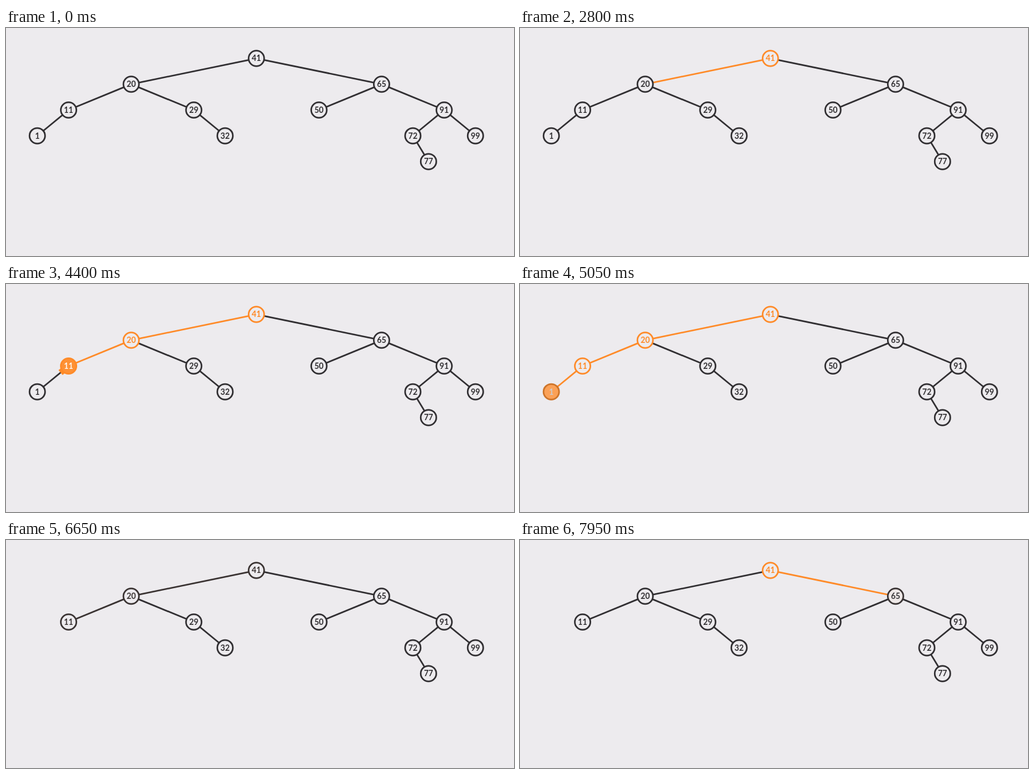
Write an HTML page that moves like this. It is 800 by 360 pixels and loops after 8000 ms.

```html
<!DOCTYPE html>
<html lang="en">
<head>
<meta charset="utf-8">
<title>Binary search tree removal</title>
<style>
  html, body { margin: 0; width: 100%; height: 100%; overflow: hidden; background: #edebee; }
  svg { display: block; width: 100%; height: 100%; }
  text { font: 700 12.5px Lato, "Open Sans", sans-serif; text-anchor: middle; }
</style>
</head>
<body>
<svg id="stage" viewBox="0 0 800 360"></svg>
<script>
const LOOP = 8000, FIRST = 1748, STEP = 510, DUR = 400;
const BG = [237, 235, 238], DARK = [48, 46, 49], ORANGE = [255, 138, 39], WHITE = [255, 255, 255];

// ring, fill, label
const LOOK = {
  idle: [DARK, BG, DARK],
  hot: [ORANGE, ORANGE, WHITE],
  seen: [ORANGE, BG, ORANGE]
};

// Insertion order builds the tree shape
const KEYS = [41, 20, 65, 11, 29, 50, 91, 1, 32, 72, 99, 77];

// Step number at which each node takes on a look
const NODE_STEPS = {
  41: [[0, 'hot'], [1, 'seen'], [9, 'idle'], [10, 'hot'], [11, 'seen']],
  20: [[2, 'hot'], [3, 'seen'], [9, 'idle']],
  11: [[4, 'hot'], [5, 'seen'], [9, 'idle']],
  1: [[6, 'hot'], [7, 'idle']],
  65: [[12, 'hot']]
};

// Steps at which the edge above a node is traced and reset
const EDGE_STEPS = { 20: [1, 9], 11: [3, 9], 1: [5, 99], 65: [11, 99] };
const REMOVED = 1, REMOVE_STEP = 8;

const stage = document.getElementById('stage');
const clamp = v => Math.max(0, Math.min(1, v));
const ease = u => u < .5 ? 4 * u ** 3 : 1 - 4 * (1 - u) ** 3;
const progress = (t, step) => clamp((t - FIRST - step * STEP) / DUR);
const mix = (a, b, u) => a.map((v, i) => v + (b[i] - v) * u);
const rgb = c => `rgb(${c.map(Math.round)})`;

function add(name, attrs, parent) {
  const el = document.createElementNS('http://www.w3.org/2000/svg', name);
  set(el, attrs);
  return parent.appendChild(el);
}
function set(el, attrs) {
  for (const k in attrs) el.setAttribute(k, attrs[k]);
}

function buildTree() {
  const nodes = [];
  for (const key of KEYS) {
    const node = { key, x: 394.3, y: 48, parent: null, kids: {} };
    let cur = nodes[0], dx = 197.15;
    while (cur) {
      const side = key < cur.key ? -1 : 1;
      node.parent = cur;
      node.x = cur.x + side * dx;
      node.y = cur.y + 40.72;
      dx /= 2;
      if (!cur.kids[side]) { cur.kids[side] = node; break; }
      cur = cur.kids[side];
    }
    nodes.push(node);
  }
  return nodes;
}

const nodes = buildTree();
const edgeLayer = add('g', {}, stage);
const traceLayer = add('g', { stroke: rgb(ORANGE), 'stroke-width': 10 }, stage);
const nodeLayer = add('g', {}, stage);

for (const n of nodes) {
  if (n.parent) {
    const from = { x1: n.parent.x, y1: n.parent.y };
    n.edge = add('line', { ...from, 'stroke-width': 2.5 }, edgeLayer);
    if (EDGE_STEPS[n.key]) n.trace = add('line', from, traceLayer);
  }
  n.disc = add('circle', { cx: n.x, cy: n.y }, nodeLayer);
  n.label = add('text', { x: n.x, y: n.y + 4.4 }, nodeLayer);
  n.label.textContent = n.key;
}

function reach(line, n, u) {
  const p = n.parent;
  set(line, { x2: p.x + (n.x - p.x) * u, y2: p.y + (n.y - p.y) * u });
}

function drawNode(n, t, size) {
  let look = LOOK.idle;
  for (const [step, name] of NODE_STEPS[n.key] || []) {
    const u = ease(progress(t, step));
    look = look.map((c, i) => mix(c, LOOK[name][i], u));
  }
  set(n.disc, {
    r: 12.25 * size, 'stroke-width': 2.5 * size,
    stroke: rgb(look[0]), fill: rgb(look[1])
  });
  n.label.setAttribute('fill', rgb(look[2]));
  n.label.style.fontSize = 12.5 * size + 'px';
  const shown = size > 0 ? 'visible' : 'hidden';
  n.disc.style.visibility = n.label.style.visibility = shown;
}

function drawEdge(n, t, size) {
  let color = DARK;
  if (n.trace) {
    const [on, off] = EDGE_STEPS[n.key];
    const u = progress(t, on);
    const tracing = u > 0 && u < 1;
    n.trace.style.visibility = tracing ? 'visible' : 'hidden';
    if (tracing) reach(n.trace, n, u);
    if (u === 1) color = mix(ORANGE, DARK, ease(progress(t, off)));
  }
  n.edge.setAttribute('stroke', rgb(color));
  n.edge.style.visibility = size > 0 ? 'visible' : 'hidden';
  reach(n.edge, n, size);
}

function render(t) {
  for (const n of nodes) {
    const size = n.key === REMOVED ? 1 - ease(progress(t, REMOVE_STEP)) : 1;
    if (n.edge) drawEdge(n, t, size);
    drawNode(n, t, size);
  }
}

const start = performance.now();
function tick(now) {
  render(Math.max(0, now - start) % LOOP);
  requestAnimationFrame(tick);
}
render(0);
requestAnimationFrame(tick);
</script>
</body>
</html>
```
